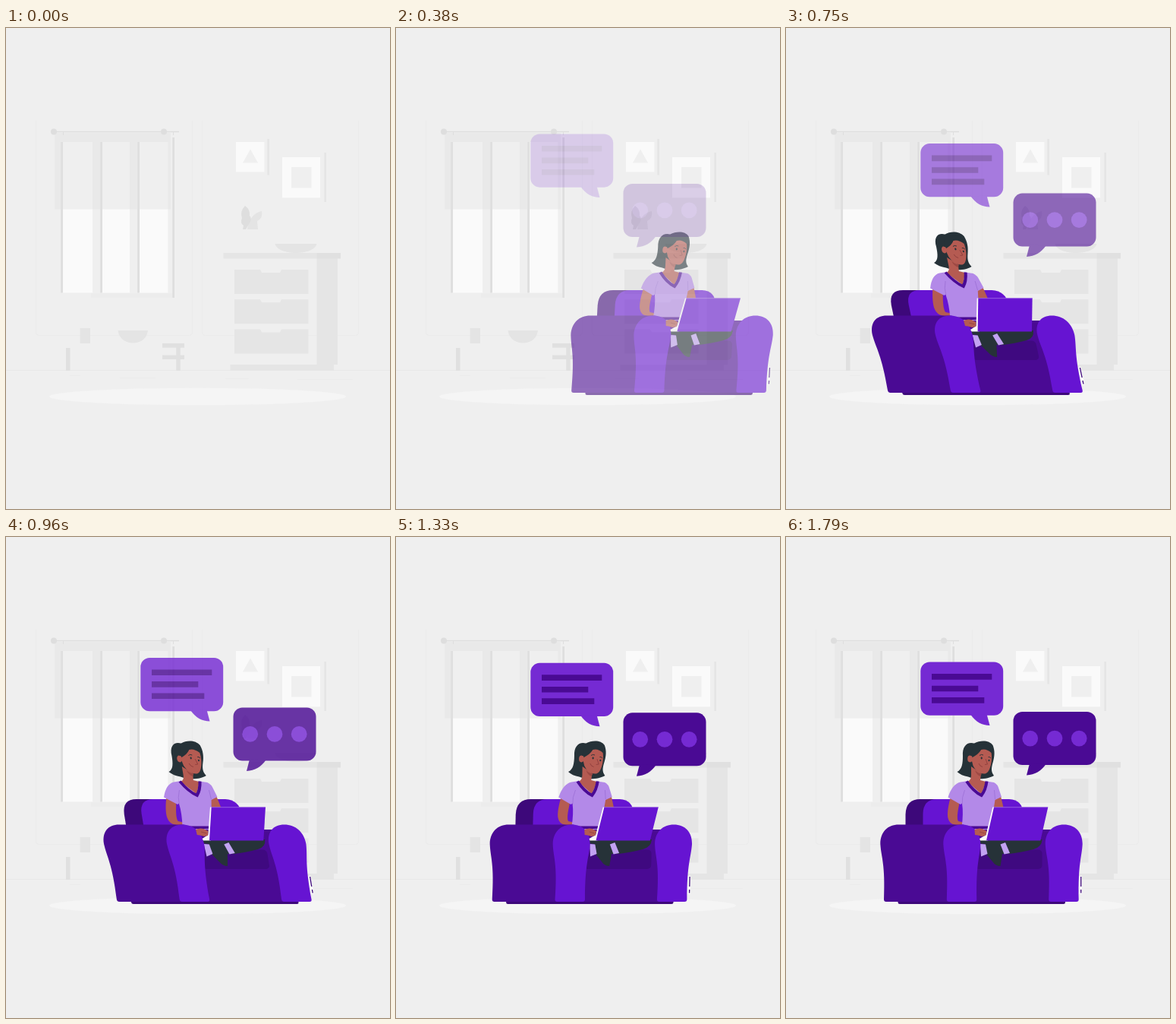
Recreate the animation shown at these times as an HTML page with a canvas. Size 506 by 633 pixels, loop 1830 ms.

```html
<!DOCTYPE html>
<html lang="en">
<head>
<meta charset="utf-8">
<title>Chat on the sofa</title>
<style>
  html, body { margin: 0; width: 100%; height: 100%; overflow: hidden; background: #efefef; }
  canvas { display: block; width: 506px; height: 633px; }
</style>
</head>
<body>
<canvas id="stage" width="506" height="633"></canvas>
<script>
const W = 506, H = 633, LOOP = 1830, STEP = 1000 / 24;
const DARK = '#4a0a94', MID = '#6614d2', DEEP = '#3d087a', BRIGHT = '#752ad3';
const SKIN = '#b55b52', HAIR = '#263238', SHIRT = '#b389e8', PALE = '#c2a2f2';

const stage = document.getElementById('stage').getContext('2d');
const layer = makeCanvas();
const room = makeCanvas();

function makeCanvas() {
  const c = document.createElement('canvas');
  c.width = W;
  c.height = H;
  return c.getContext('2d');
}

// Drawing helpers
function fill(c, color, d) {
  c.fillStyle = color;
  c.fill(new Path2D(d));
}
function line(c, color, width, d) {
  c.strokeStyle = color;
  c.lineWidth = width;
  c.stroke(new Path2D(d));
}
function box(c, color, x1, y1, x2, y2, r = 0) {
  c.fillStyle = color;
  c.beginPath();
  c.roundRect(x1, y1, x2 - x1, y2 - y1, r);
  c.fill();
}
function oval(c, color, x, y, rx, ry = rx) {
  c.fillStyle = color;
  c.beginPath();
  c.ellipse(x, y, rx, ry, 0, 0, 7);
  c.fill();
}

// Still background
function drawRoom(c) {
  box(c, '#efefef', 0, 0, W, H);
  for (const x of [39.5, 258.5])
    line(c, '#ebebeb', 1, `M${x} 122V400Q${x} 404.5 ${x + 4} 404.5H${x + 202}Q${x + 206} 404.5 ${x + 206} 400V122`);
  line(c, '#e8e8e8', 1, 'M0 450.5H506');
  line(c, '#ebebeb', 1, 'M150 460.5H197M289 461.5H320M384 462.5H457M84 457.5H98');

  // window
  box(c, '#ececec', 112, 349, 222, 355);
  for (const [x1, x2] of [[74, 114], [126, 163], [175, 213.5]]) {
    box(c, '#fafafa', x1, 150, x2, 348.5);
    box(c, '#dedede', x1 - 1.8, 150, x1 + 1, 348.5);
  }
  box(c, 'rgba(223,223,223,.45)', 64.5, 138, 217, 238.5);
  box(c, '#dedede', 219.3, 144, 222, 355);
  line(c, '#dedede', 1.6, 'M63 136.5H228');
  line(c, '#dedede', 1, 'M75.5 137V141M220.5 137V141');
  oval(c, '#dedede', 63, 136.5, 4);
  oval(c, '#dedede', 208, 136.5, 4);

  // pictures
  box(c, '#e5e5e5', 344.3, 146, 347, 193.5);
  box(c, '#fafafa', 303, 150, 340.5, 189.5);
  fill(c, '#efefef', 'M322 159.5L332 177.5H312Z');
  box(c, '#e5e5e5', 419.3, 164, 422, 229);
  box(c, '#fafafa', 364, 170, 414, 223.5);
  box(c, '#efefef', 376, 183, 402.5, 210.5);

  // plant and bowl
  fill(c, '#e4e4e4', 'M318 265C319 252 327 243 337 241Q339 250 331 254L332 265Z');
  fill(c, '#dedede', 'M312 265L313 260Q308 257 311 250Q308 241 315 234Q322 239 321 247Q325 251 320 258L316 265Z');
  fill(c, '#e4e4e4', 'M354.5 284H409.5C406 300 358 300 354.5 284Z');

  // chest of drawers
  box(c, '#e5e5e5', 409.5, 303, 437, 443);
  box(c, '#e5e5e5', 286.5, 296, 410, 303.5);
  box(c, '#e0e0e0', 409.5, 296, 441, 303.5);
  box(c, '#e5e5e5', 295.5, 443, 432, 451);
  for (const y of [318, 357.3, 396.6])
    fill(c, '#e5e5e5', `M301 ${y}H335L337 ${y + 4}H361L363 ${y}H398.5V${y + 32}H301Z`);

  // side table
  box(c, '#e4e4e4', 97.5, 395, 111, 415);
  fill(c, '#e4e4e4', 'M147.5 398H187C185 420 150 420 147.5 398Z');
  box(c, '#e0e0e0', 79, 421, 84.5, 451);
  box(c, '#e0e0e0', 206, 415, 235, 420.7);
  box(c, '#e0e0e0', 206, 430.5, 235, 436);
  box(c, '#e0e0e0', 224.3, 420, 229.7, 451);

  oval(c, '#f5f5f5', 252.5, 485, 195.5, 11.3);
}

function armFront(c, x) {
  fill(c, MID, `M${x + 4.5} 477C${x + 7} 430 ${x + 1} 422 ${x} 404C${x} 388 ${x + 10} 378.5 ${x + 24.5} 378.5
    S${x + 49} 388 ${x + 49} 404C${x + 48} 422 ${x + 43} 430 ${x + 44} 477Q${x + 44} 480 ${x + 41} 480
    H${x + 7.5}Q${x + 4.5} 480 ${x + 4.5} 477Z`);
}

function drawSofaBack(c) {
  fill(c, DEEP, 'M157.5 385V365Q158 345 177 345H205V385Z');
  fill(c, MID, 'M180.5 390V364Q181 345 199 345H294Q312 346 312.5 364V390Z');
  box(c, DEEP, 147.5, 474, 368, 483, 2.5);
  box(c, DARK, 236, 385, 352, 480);
  box(c, '#3f0980', 249, 411.5, 337.5, 437, 5);
}

function drawHead(c) {
  fill(c, HAIR, `M225.5 309C232 306 233 298 233 288C232 275 239 269 248 271.5
    C256 267 268 267 272.5 274C275.5 281 275 289 272.5 297C270.5 304 270 309 274 314
    C266 319 250 320 240 315.5Q231 314 225.5 309Z`);
  fill(c, SKIN, 'M244 302L257 311L256 320L263.5 322Q260 333 257 338L239 322Q244 320 244 314Z');
  fill(c, '#9d4944', 'M249 307Q253 311 258 311.5L256 315Q251 313 249 307Z');
  fill(c, SKIN, `M244 291C250 288 255 284 257 280Q264 278 270.5 284C272.5 294 269 311 262 311.5
    C255 312 250 308 246.5 301Z`);
  oval(c, SKIN, 242.5, 292, 3.3, 4.4);
  fill(c, HAIR, 'M243 288Q254 286 258 278Q262 277 270 282L267 273L247 274Z');
  oval(c, HAIR, 257.7, 291, 1.1, 1.4);
  oval(c, HAIR, 267.5, 294, 1, 1.3);
  line(c, HAIR, .9, 'M255 287.5Q257.5 285.5 260 287M266.5 289.5Q268.5 289 270 291');
  line(c, '#8f3f3d', .9, 'M263 292L265.5 299L262 299.5M254 298Q255.5 302 259 302.5');
}

function drawBody(c) {
  fill(c, SKIN, 'M274 342L283 341L287 358H274Z');
  fill(c, SKIN, 'M217 342C214 352 212 364 213.5 370Q215 377 222 378.5L251 386L254 380L227 374Q224 370 229 348Z');
  fill(c, SHIRT, `M230 322.5L240 321L258 340L264 321.5L274 323Q279 325 281 333L284 342L275.5 346
    Q272 364 274 381.5H231.5Q234 364 232 350.5L230 352L213.5 342.5Q219 325 230 322.5Z`);
  line(c, '#9c70d6', .8, 'M235.5 333Q231.5 343 232.3 351M274.5 333L275.5 345');
  box(c, DARK, 231, 380.5, 274, 384);
  line(c, SHIRT, 1, 'M232 384.5H273');
  drawHead(c);
  line(c, DARK, 4, 'M238 321.5Q247 335 257.5 340Q263 333 264.5 321.5');
}

function drawLap(c) {
  fill(c, HAIR, `M253 398H337.5Q337 408 326 411Q308 415.5 294 417L285 417L282.5 433
    Q276 433 272 427L264.5 418L262 404L253 403Z`);
  fill(c, PALE, 'M256 404L263 404.5L265.5 417L257 420.5Z');
  fill(c, PALE, 'M282.5 404.5L289 402L295 416L287.5 417.5Z');
}

function drawLaptop(c) {
  fill(c, '#fafafa', 'M272.3 355.5H274.5L266 399.5H256L255 397L263.5 392Z');
  fill(c, MID, 'M274 355.5H345.3L335.3 399.5H264Z');
  line(c, '#9f6ce4', .8, 'M274 355.7H345');
  fill(c, SKIN, 'M248.5 385Q254 382.5 259 384L264.5 387L263 393L258 394Q252 392 249 392Z');
  line(c, '#8f3f3d', .7, 'M255 388L262 390');
}

function drawSofa(c) {
  drawSofaBack(c);
  drawBody(c);
  drawLap(c);
  fill(c, DARK, `M129 477C131 430 125.5 422 124.3 404C124.3 388 134 378.5 148.5 378.5H234V480H132
    Q129 480 129 477Z`);
  armFront(c, 207.3);
  drawLaptop(c);
  armFront(c, 341.7);
  box(c, '#fafafa', 386.5, 446, 390, 470);
  line(c, DEEP, 1.3, 'M388.7 447V460M388.7 464V468.5');
}

function drawBubbles(c) {
  box(c, BRIGHT, 177.3, 164.5, 286.2, 234.7, 12);
  fill(c, BRIGHT, 'M243.5 234C250 243 258 248 268.5 248L264.5 233Z');
  box(c, DARK, 192, 180, 271.3, 187.6);
  box(c, DARK, 192, 195.6, 253.3, 203.2);
  box(c, DARK, 192, 211, 261.3, 218.6);
  box(c, DARK, 299.5, 230, 408.5, 300, 12);
  fill(c, DARK, 'M321 298L317 313.5C328 313 336 308 342.5 299Z');
  for (const x of [321.7, 354, 386.2]) oval(c, BRIGHT, x, 265, 10.4);
}

// Overshooting ease: cubic-bezier(.36, -.01, .5, 1.38)
function ease(x) {
  if (x <= 0) return 0;
  if (x >= 1) return 1;
  const curve = (a, b, u) => 3 * (1 - u) * u * (a * (1 - u) + b * u) + u ** 3;
  let lo = 0, hi = 1;
  for (let i = 0; i < 24; i++) {
    const mid = (lo + hi) / 2;
    if (curve(.36, .5, mid) < x) lo = mid; else hi = mid;
  }
  return curve(-.01, 1.38, lo);
}

const tan = deg => Math.tan(deg * Math.PI / 180);
const mix = (a, b, p) => a + (b - a) * p;

// Slide in from the right while leaning, then sway to rest
function sofaPose(t) {
  const x = (t + 17) / 1565;
  if (x < .6) {
    const p = ease(x / .6);
    return { dx: 253 * (1 - p), skew: mix(tan(-20), tan(10), p), alpha: p };
  }
  const deg = x < .8 ? mix(10, -2, ease((x - .6) / .2)) : mix(-2, 0, ease((x - .8) / .2));
  return { dx: 0, skew: tan(deg), alpha: 1 };
}

// Each group is painted solid first, then faded as one
function fadeIn(draw, alpha, matrix) {
  if (alpha <= 0) return;
  layer.setTransform(1, 0, 0, 1, 0, 0);
  layer.clearRect(0, 0, W, H);
  layer.setTransform(...matrix);
  draw(layer);
  stage.globalAlpha = Math.min(1, alpha);
  stage.drawImage(layer.canvas, 0, 0);
  stage.globalAlpha = 1;
}

function render(t) {
  stage.drawImage(room.canvas, 0, 0);
  const { dx, skew, alpha } = sofaPose(t);
  fadeIn(drawSofa, alpha, [1, 0, skew, 1, dx - skew * 375.5, 0]);
  const q = ease((t + 25) / 1820);
  fadeIn(drawBubbles, q, [1, 0, 0, 1, 0, -30.4 * (1 - q)]);
}

drawRoom(room);
const start = performance.now();
function tick() {
  const t = (performance.now() - start) % LOOP;
  render(Math.floor((t + 5) / STEP) * STEP);
  requestAnimationFrame(tick);
}
tick();
</script>
</body>
</html>
```
